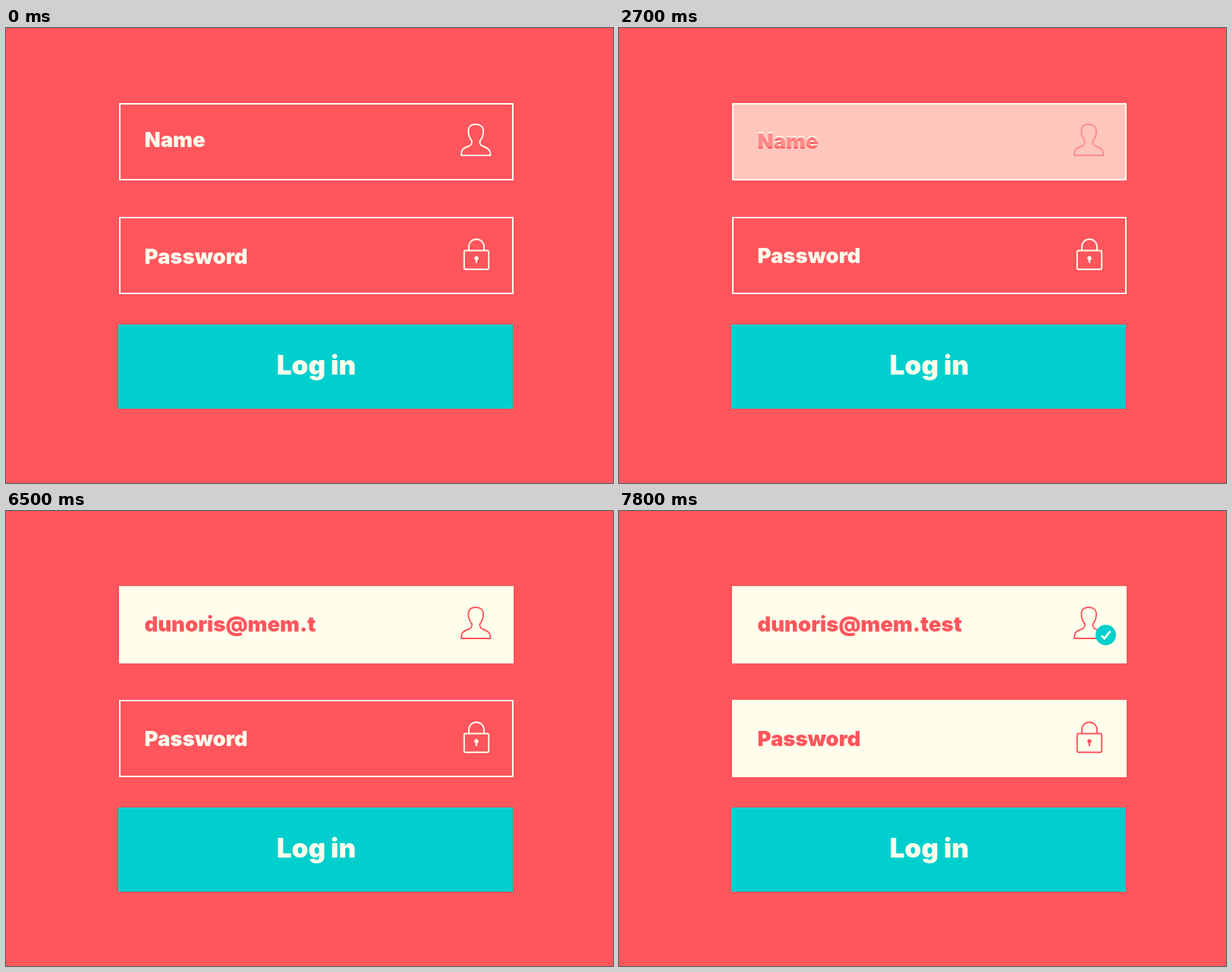
Write an HTML page that moves like this. It is 800 px wide and 600 px high and loops after 8000 ms.

```html
<!DOCTYPE html>
<html lang="en">
<head>
<meta charset="utf-8">
<title>Log in</title>
<style>
  :root { --red: #ff555d; --cream: #fffeec; --teal: #00cfcd; }
  html, body { margin: 0; width: 100%; height: 100%; overflow: hidden; background: var(--red); }
  svg { display: block; width: 100%; height: 100%; }
  text { font: 900 27.5px Inter, "Open Sans", sans-serif; fill: currentColor; }
  .icon { fill: none; stroke: currentColor; stroke-width: 1.9; stroke-linejoin: round; }
  .keyhole { fill: currentColor; stroke: none; }
  .outline { color: var(--cream); }
  .filled { color: var(--red); }
  .frame { fill: none; stroke: var(--cream); stroke-width: 2; }
  .panel { fill: var(--cream); }
</style>
</head>
<body>
<svg viewBox="0 0 800 600">
  <defs>
    <path id="person" class="icon" d="M619 127C613 127 609 130 609.5 137C609.5 143 612 146 614 149C614.5 154 612 155 607 157C602 159 600 161 600 168H638.5C638.5 161 636 159 631 157C626 155 624 154 624.5 149C627 146 629 143 629 137C629.5 130 625 127 619 127Z"/>
    <g id="lock" class="icon">
      <rect x="603.8" y="293.5" width="32.4" height="24.8" rx="2"/>
      <path d="M610 293V288.5a10 10 0 0 1 20 0V293"/>
      <path class="keyhole" d="M618.9 310V306.2a2.8 2.8 0 1 1 2.2 0V310Z"/>
    </g>
  </defs>

  <g class="outline">
    <rect class="frame" x="150" y="100" width="518" height="100"/>
    <text x="182.5" y="157">Name</text>
    <use href="#person"/>
    <rect class="frame" x="150" y="250" width="518" height="100"/>
    <text id="password" x="182.5" y="311">Password</text>
    <use href="#lock"/>
  </g>

  <g id="nameFill" class="filled">
    <rect class="panel" x="149" y="99" width="520" height="102"/>
    <text id="entry" x="182.5" y="159">Name</text>
    <use href="#person"/>
    <g id="badge">
      <circle r="13.5" fill="var(--teal)"/>
      <path d="M-5.5 .8L-1.8 4.6L6 -5" fill="none" stroke="var(--cream)" stroke-width="2.8"/>
    </g>
  </g>

  <g id="passwordFill" class="filled">
    <rect class="panel" x="149" y="249" width="520" height="102"/>
    <text x="182.5" y="310">Password</text>
    <use href="#lock"/>
  </g>

  <g class="outline">
    <rect x="148" y="391" width="520" height="111" fill="var(--teal)"/>
    <text x="409" y="457" text-anchor="middle" style="font-size:35px">Log in</text>
  </g>
</svg>
<script>
const LOOP = 8000;
const EMAIL = 'dunoris@mem.test';
const KEY_TIMES = [3600, 3800, 4100, 4300, 4500, 4700, 4900, 5100,
                   5300, 5600, 5900, 6200, 6400, 6600, 6800, 7000];
const el = id => document.getElementById(id);
const [password, nameFill, entry, badge, passwordFill] =
  ['password', 'nameFill', 'entry', 'badge', 'passwordFill'].map(el);

const progress = (t, from, to) => Math.min(1, Math.max(0, (t - from) / (to - from)));
const easeOut = p => 1 - (1 - p) ** 3;

function draw(t) {
  nameFill.setAttribute('opacity', progress(t, 2500, 2800));
  passwordFill.setAttribute('opacity', progress(t, 7450, 7750));
  password.setAttribute('y', t < 2600 ? 311 : 310);

  const typed = KEY_TIMES.filter(time => time <= t).length;
  const value = typed ? EMAIL.slice(0, typed) : 'Name';
  if (entry.textContent !== value) entry.textContent = value;

  const scale = easeOut(progress(t, 7050, 7350));
  badge.setAttribute('transform', `translate(641.5 163.5) scale(${scale})`);
}

const start = performance.now();
function tick() {
  draw((performance.now() - start) % LOOP);
  requestAnimationFrame(tick);
}
tick();
</script>
</body>
</html>
```
